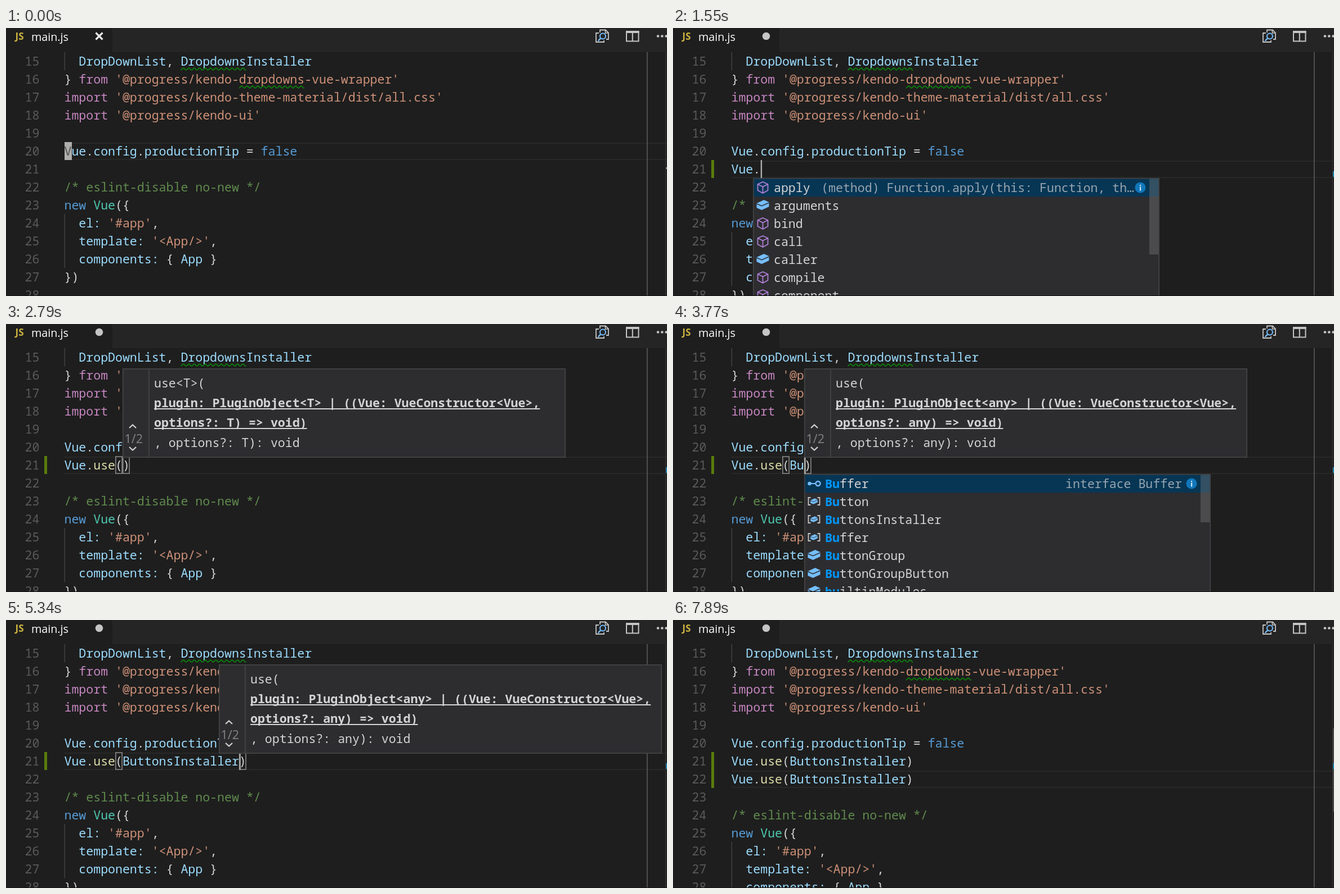
These frames come from a looping animation (1174x477 px, 8000 ms). An HTML page with a canvas:

```html
<!DOCTYPE html>
<html lang="en">
<head>
<meta charset="utf-8">
<title>Editor</title>
<style>
  html, body { margin: 0; width: 100%; height: 100%; overflow: hidden; background: #1e1e1e; }
  canvas { display: block; width: 1174px; height: 477px; }
</style>
</head>
<body>
<canvas id="stage"></canvas>
<script>
const W = 1174, H = 477, LOOP = 8000;
const X0 = 103.5, CW = 12.93, LH = 32, TOP = 43, FIRST = 15;
const MONO = '21.55px "Noto Sans Mono", "DejaVu Sans Mono", monospace';
const SANS = '"Open Sans", "Noto Sans", sans-serif';
const COLORS = {
  v: '#9cdcfe', k: '#c586c0', s: '#ce9178', b: '#569cd6',
  t: '#4ec9b0', c: '#608b4e', f: '#dcdcaa', p: '#d4d4d4'
};
const TEXT = '#d4d4d4', BLUE = '#75beff', ICON = '#c5c5c5', PANEL = '#2d2d30', EDGE = '#454545';

const canvas = document.getElementById('stage');
const ctx = canvas.getContext('2d');
const dpr = window.devicePixelRatio || 1;
canvas.width = W * dpr;
canvas.height = H * dpr;

// Each line is a row of "colour:text" tokens.
const HEAD = [
  "v:  DropDownList|p:, |v:DropdownsInstaller",
  "p:} |k:from |s:'@progress/kendo-dropdowns-vue-wrapper'",
  "k:import |s:'@progress/kendo-theme-material/dist/all.css'",
  "k:import |s:'@progress/kendo-ui'",
  "",
  "v:Vue|p:.|v:config|p:.|v:productionTip|p: = |b:false"
];
const TAIL = [
  "",
  "c:/* eslint-disable no-new */",
  "b:new |t:Vue|p:({",
  "v:  el: |s:'#app'|p:,",
  "v:  template: |s:'<App/>'|p:,",
  "v:  components: |p:{ |v:App |p:}",
  "p:})",
  ""
];
const useLine = arg => `v:Vue|p:.|f:use|p:(|v:${arg}|p:)`;

// Suggestions are "kind:label"; m method, f field, i interface, x variable.
const list = (col, items, query, detail, more = {}) =>
  ({ col, items: items.split(' '), query, detail, sel: 0, bar: 0, ...more });
const VUE = 'x:Vue i:VTTCue i:SVGNumber i:SVGNumberList i:SVGUnitTypes i:SVGFEFuncAElement i:SVGFEFuncBElement';
const MEMBERS = 'm:apply f:arguments m:bind m:call f:caller m:compile m:component';
const BU = 'i:Buffer x:Button x:ButtonsInstaller x:Buffer f:ButtonGroup f:ButtonGroupButton f:builtinModules';
const BUTTON = 'x:Button x:ButtonsInstaller f:ButtonGroup f:ButtonGroupButton i:GamepadButton i:HTMLButtonElement f:KendoButton';
const USE = '(method) VueConstructor<Vue>.use<T>(plugin: PluginObject<T>';
const ALIAS = '(alias) (property) Button: any';

// Every step changes only the named parts of the state before it.
const STEPS = [
  [0, { added: [], row: 20, col: 0, cursor: 'block', bar: null }],
  [300, { cursor: '' }],
  [620, { added: [''], row: 21, cursor: 'line', bar: [22, 1], slider: true }],
  [930, { cursor: '', slider: false }],
  [1230, { added: ['v:Vu'], col: 2, cursor: 'line', bar: [21, 1],
    list: list(2, VUE, 'Vu', '(alias) const Vue: VueConstructor<Vue>') }],
  [1550, { added: ['v:Vue|p:.'], col: 4,
    list: list(3, MEMBERS, '', '(method) Function.apply(this: Function, thisArg: any)', { bar: 135 }) }],
  [1860, { added: ['v:Vue|p:.|v:us'], col: 6, list: list(6, 'm:use', 'us', USE) }],
  [2170, { added: ['v:Vue|p:.|v:use'], col: 7, list: list(7, 'm:use', 'use', USE) }],
  [2490, { added: [useLine('')], col: 8, match: 8, list: null, sign: 'T' }],
  [2790, { cursor: '' }],
  [3130, { added: [useLine('B')], col: 9, match: 9, cursor: 'line', list: list(9, BU, 'B', '', { bar: 60 }) }],
  [3470, { sign: 'any', list: list(9, BU, 'B', 'interface Buffer', { bar: 60 }) }],
  [3770, { added: [useLine('Bu')], col: 10, match: 10, list: list(10, BU, 'Bu', 'interface Buffer', { bar: 85 }) }],
  [4090, { added: [useLine('Butt')], col: 12, match: 12, list: list(12, BUTTON, 'Butt', ALIAS) }],
  [4410, { added: [useLine('Button')], col: 14, match: 14, list: list(14, BUTTON, 'Button', ALIAS) }],
  [4710, { list: list(14, BUTTON, 'Button', '(alias) (property) ButtonsInstaller: any', { sel: 1 }) }],
  [5020, { cursor: '' }],
  [5340, { added: [useLine('ButtonsInstaller')], col: 24, match: 24, cursor: 'line', list: null }],
  [5650, { cursor: '' }],
  [6300, { cursor: 'line' }],
  [6620, { cursor: 'block', col: 23, match: 0 }],
  [6930, { cursor: '' }],
  [7250, { cursor: 'block' }],
  [7580, { added: [useLine('ButtonsInstaller'), useLine('ButtonsInstaller')], row: 22, col: 0,
    bar: [21, 2], sign: null, slider: true }],
  [7890, { cursor: '' }]
];

const stateAt = t => Object.assign({}, ...STEPS.filter(s => s[0] <= t).map(s => s[1]));
const lineTop = n => TOP + (n - FIRST) * LH;
const colX = c => X0 + c * CW;

function rect(x, y, w, h, color) {
  ctx.fillStyle = color;
  ctx.fillRect(x, y, w, h);
}

function write(text, x, y, font, color) {
  ctx.font = font;
  ctx.fillStyle = color;
  ctx.fillText(text, x, y);
}

// Letters sit on the fixed column grid.
function mono(text, x, y, color, bold) {
  const font = (bold ? 'bold ' : '') + MONO;
  [...text].forEach((ch, i) => { if (ch !== ' ') write(ch, x + i * CW, y, font, color); });
}

function paint({ fill, stroke, width = 2 }) {
  if (fill) { ctx.fillStyle = fill; ctx.fill(); }
  if (stroke) { ctx.strokeStyle = stroke; ctx.lineWidth = width; ctx.stroke(); }
}

function path(points, style, close = true) {
  ctx.beginPath();
  points.forEach(([x, y]) => ctx.lineTo(x, y));
  if (close) ctx.closePath();
  paint(style);
}
const line = (points, stroke, width) => path(points, { stroke, width }, false);

function circle(x, y, r, style) {
  ctx.beginPath();
  ctx.arc(x, y, r, 0, 7);
  paint(style);
}

function panel(x, y, w, h) {
  rect(x, y, w, h, EDGE);
  rect(x + 1.6, y + 1.6, w - 3.2, h - 3.2, PANEL);
}

function squiggle(col, count, row) {
  const start = colX(col), y = lineTop(row) + 30;
  ctx.beginPath();
  for (let x = 0; x <= count * CW; x += 0.8) {
    ctx.lineTo(start + x, y + 1.8 * Math.cos(x * 2 * Math.PI / 9.6));
  }
  paint({ stroke: '#0a8a0a', width: 1.6 });
}

function drawTokens(row, src) {
  let col = 0;
  for (const token of src ? src.split('|') : []) {
    const text = token.slice(2);
    mono(text, colX(col), lineTop(row) + 24, COLORS[token[0]]);
    col += text.length;
  }
}

function charAt(src, col) {
  return src.split('|').map(s => s.slice(2)).join('')[col] || ' ';
}

function drawCode(s) {
  const lines = [...HEAD, ...s.added, ...TAIL];
  const y = lineTop(s.row);
  rect(104, y + 1, W - 104, 2, '#282828');
  rect(104, y + LH - 2, W - 104, 2, '#282828');
  lines.forEach((src, i) => {
    const row = FIRST + i;
    if (lineTop(row) > H) return;
    if (src.slice(2, 4) === '  ') rect(103.5, lineTop(row), 1.6, LH, '#404040');
    mono(String(row), 33.5, lineTop(row) + 24, '#5a5a5a');
    drawTokens(row, src);
  });
  squiggle(16, 9, 15);
  squiggle(24, 9, 16);
  if (s.bar) rect(68, lineTop(s.bar[0]), 5, s.bar[1] * LH, '#587c0c');
  if (s.match) {
    for (const col of [7, s.match]) {
      ctx.strokeStyle = '#888';
      ctx.lineWidth = 1.6;
      ctx.strokeRect(colX(col) + 0.8, y + 1, CW - 1.6, LH - 2);
    }
  }
  const x = Math.round(colX(s.col));
  if (s.cursor === 'line') rect(colX(s.col) + 0.5, y, 2.4, LH, '#aeafad');
  if (s.cursor === 'block') {
    rect(x, y, 13, LH, '#aeafad');
    mono(charAt(lines[s.row - FIRST], s.col), colX(s.col), y + 24, '#515052');
  }
}

function drawEdge(s) {
  rect(1138, TOP, 1.6, H - TOP, '#5a5a5a');
  rect(1171, TOP, 1.4, H - TOP, '#333');
  if (s.slider) rect(1172, 193, 2, 148, '#4a4a4a');
  if (s.added.length) rect(1172, 255, 2, 10, '#1b81a8');
  else rect(1172, 248, 2, 3, '#8a8a8a');
}

// Solid brick with a thin seam under its top face
function brick(x, y, k) {
  const at = pts => pts.map(([a, b]) => [x + a * k, y + b * k]);
  path(at([[-11, -3], [2, -9], [11, -5], [11, 3], [-2, 9], [-11, 5]]), { fill: BLUE });
  line(at([[-11, -2.2], [-2, 1.8], [11, -4]]), PANEL, 1.5 * k);
}

const ICONS = {
  m(x, y) {
    const p = { stroke: '#b180d7', width: 1.8 };
    path([[x, y - 10], [x + 9, y - 6], [x + 9, y + 5], [x, y + 10], [x - 9, y + 5], [x - 9, y - 6]], p);
    line([[x - 9, y - 6], [x, y - 1.5], [x + 9, y - 6]], p.stroke, 1.8);
    line([[x, y - 1.5], [x, y + 10]], p.stroke, 1.8);
  },
  f(x, y) { brick(x, y - 1, 1); },
  i(x, y) {
    circle(x - 8, y, 3.2, { fill: BLUE });
    line([[x - 6, y], [x + 3, y]], BLUE, 2);
    circle(x + 7, y, 4, { stroke: BLUE, width: 2.4 });
  },
  x(x, y) {
    for (const d of [-1, 1]) {
      line([[x + d * 6, y - 7], [x + d * 10, y - 7], [x + d * 10, y + 6], [x + d * 6, y + 6]], ICON, 1.8);
    }
    brick(x, y - 0.5, 0.58);
  }
};

// Indexes of the letters that match the typed word.
function hits(label, query) {
  const low = label.toLowerCase(), q = query.toLowerCase(), found = new Set();
  const at = low.indexOf(q);
  let from = 0;
  [...q].forEach((ch, i) => {
    const k = at >= 0 ? at + i : low.indexOf(ch, from);
    found.add(k);
    from = k + 1;
  });
  return found;
}

function drawList({ col, items, query, detail, sel, bar }) {
  const x = Math.round(colX(col)), y = 267, w = 722, h = items.length * LH;
  panel(x, y, w, h);
  ctx.save();
  ctx.beginPath();
  ctx.rect(x + 1.6, y + 1.6, w - 3.2, h - 3.2);
  ctx.clip();
  items.forEach((item, i) => {
    const top = y + 1 + i * LH, base = top + 24, label = item.slice(2);
    const marked = hits(label, query), lx = x + 37;
    if (i === sel) rect(x, top, w, LH, '#073655');
    ICONS[item[0]](x + 17.5, top + 16);
    [...label].forEach((ch, k) =>
      mono(ch, lx + k * CW, base, marked.has(k) ? '#0097fb' : TEXT, marked.has(k)));
    if (i === sel && detail) drawDetail(detail, lx + label.length * CW + 19.5, x + 688, base);
  });
  if (bar) rect(x + w - 18, y + 1, 17, bar, 'rgba(121,121,121,.4)');
  ctx.restore();
}

function drawDetail(text, start, info, base) {
  const room = Math.floor((info - 9 - start) / CW);
  const fits = start + text.length * CW <= info - 17;
  const shown = fits ? text : text.slice(0, room - 1) + '…';
  mono(shown, fits ? info - 17 - text.length * CW : start, base, '#96a5b0');
  circle(info, base - 8, 9.5, { fill: '#1177bb' });
  rect(info - 1, base - 9.5, 2.2, 7, '#cfe3f0');
  rect(info - 1, base - 13, 2.2, 2.2, '#cfe3f0');
}

function drawSignature(type, col) {
  const x = Math.min(Math.round(colX(col)), 378), y = 79;
  panel(x, y, 787, 159);
  rect(x + 46, y + 1.6, 1.6, 156, EDGE);
  line([[x + 12, 185], [x + 18, 179.5], [x + 24, 185]], TEXT, 2.2);
  line([[x + 12, 219], [x + 18, 224.5], [x + 24, 219]], TEXT, 2.2);
  write('1/2', x + 3.5, 212, '21.5px ' + SANS, '#848485');
  const rows = [
    type === 'T' ? 'use<T>(' : 'use(',
    `plugin: PluginObject<${type}> | ((Vue: VueConstructor<Vue>,`,
    `options?: ${type}) => void)`,
    `, options?: ${type}): void`
  ];
  rows.forEach((text, i) => {
    const bold = i === 1 || i === 2, base = 113 + i * 35.2;
    mono(text, x + 56, base, TEXT, bold);
    if (bold) rect(x + 56, Math.round(base + 1.5), text.length * CW, 2, TEXT);
  });
}

function drawTabs(dirty) {
  rect(0, 0, W, TOP, '#252526');
  rect(0, 0, 189, TOP, '#1e1e1e');
  write('JS', 16.5, 20.5, 'bold 17px "Noto Sans", sans-serif', '#cbb341');
  write('main.js', 45, 22.5, '19.7px ' + SANS, '#fff');
  if (dirty) circle(165.5, 14.5, 6.8, { fill: ICON });
  else {
    line([[159.5, 8.5], [171.5, 20.5]], '#e8e8e8', 3.2);
    line([[171.5, 8.5], [159.5, 20.5]], '#e8e8e8', 3.2);
  }
  // Page with a magnifier
  line([[1055, 8], [1055, 3.5], [1065, 3.5], [1070, 8.5], [1070, 20], [1066, 20]], ICON, 1.8);
  line([[1064.5, 4], [1064.5, 9], [1070, 9]], ICON, 1.6);
  line([[1053, 9], [1048, 9], [1048, 25], [1062, 25], [1062, 22]], ICON, 1.8);
  circle(1060, 14.5, 5, { stroke: BLUE, width: 2 });
  line([[1056.5, 18], [1051.5, 23]], BLUE, 2.4);
  // Split view
  ctx.strokeStyle = ICON;
  ctx.lineWidth = 2;
  ctx.strokeRect(1102, 6, 21.5, 17.5);
  rect(1101, 5, 23.5, 4, ICON);
  rect(1111.8, 7, 2, 16, ICON);
  for (const x of [1158, 1165.3, 1172.6]) circle(x, 14.5, 2.3, { fill: ICON });
}

function draw(t) {
  const s = stateAt(t);
  ctx.setTransform(dpr, 0, 0, dpr, 0, 0);
  rect(0, 0, W, H, '#1e1e1e');
  drawCode(s);
  drawEdge(s);
  if (s.list) drawList(s.list);
  if (s.sign) drawSignature(s.sign, s.col);
  drawTabs(s.added.length > 0);
  rect(0, H - 1, W, 1, '#141414');
}

const begin = performance.now();
function tick() {
  draw((performance.now() - begin) % LOOP);
  requestAnimationFrame(tick);
}
tick();
</script>
</body>
</html>
```
